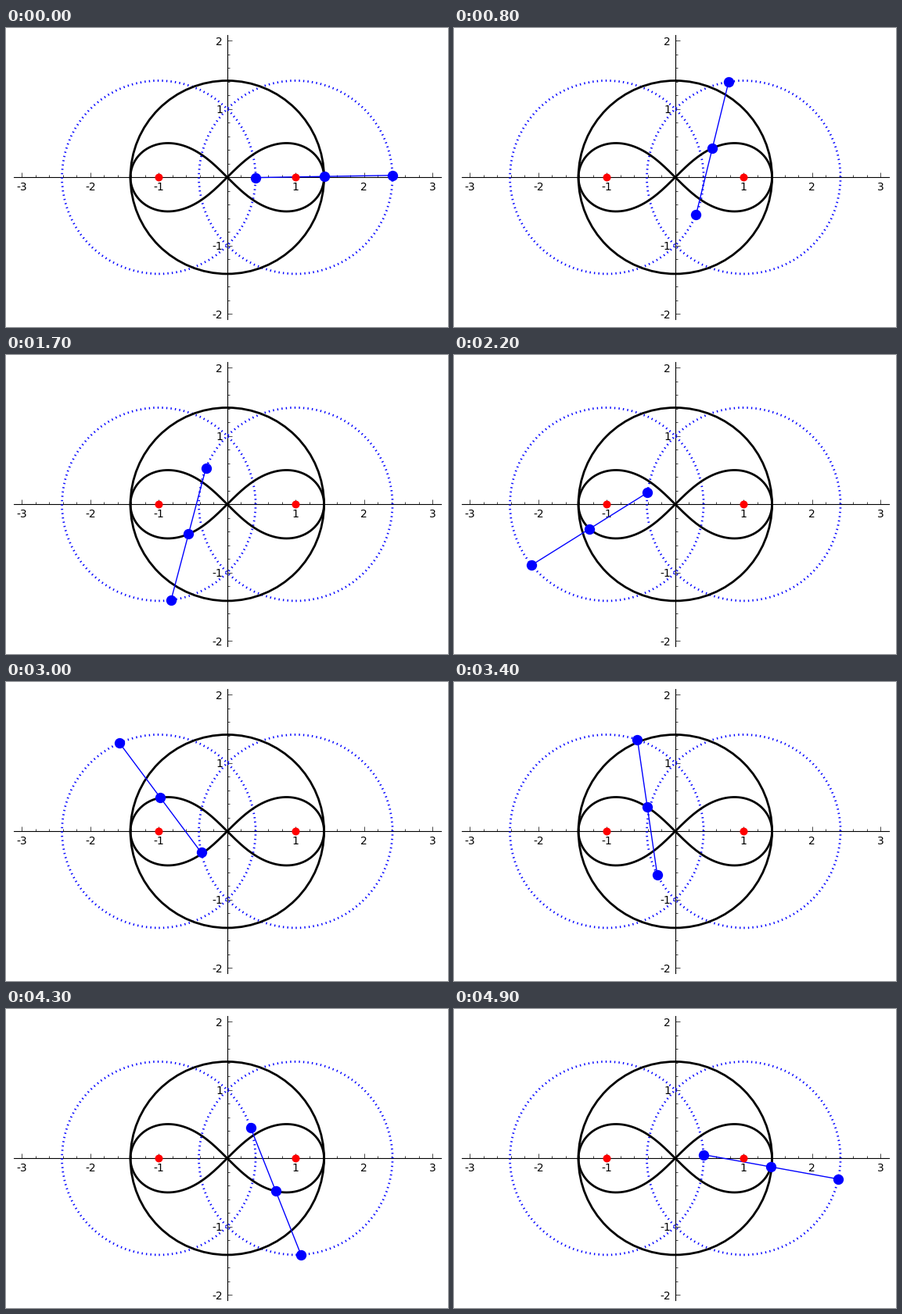
A matplotlib script that plays this animation: 565x383 px, repeating every 5000 ms.

```python
import numpy as np
import matplotlib.pyplot as plt
from matplotlib.animation import FuncAnimation
from matplotlib.patches import Circle

W, H, DPI = 565, 383, 100
FRAMES, INTERVAL = 50, 100
AX_W, AX_H = 546, 364
LEFT, TOP = 9.8, 9.2
R = np.sqrt(2)

plt.rcParams["font.family"] = "DejaVu Sans"
plt.rcParams["axes.unicode_minus"] = False


def lemniscate(t):
    s, c = np.sin(t), np.cos(t)
    x = R * c / (1 + s * s)
    return x, x * s


def linkage(frame):
    """Left end, middle and right end of the moving rod."""
    u = 2 * np.pi * frame / FRAMES + np.radians(0.6)
    t = u + np.radians(-6.95 * np.sin(2 * u) + 0.35 * np.sin(4 * u))
    x, y = lemniscate(t)
    # the rod turns at twice the polar angle of its midpoint
    tilt = 2 * np.arctan(np.sin(t))
    k = np.array([-1, 0, 1])
    return x + k * np.cos(tilt), y + k * np.sin(tilt)


def setup_axes(fig):
    ax = fig.add_axes([LEFT / W, 1 - (TOP + AX_H) / H, AX_W / W, AX_H / H])
    ax.set(xlim=(-3.12, 3.12), ylim=(-2.08, 2.08))
    ax.patch.set_visible(False)
    for side in ("top", "right"):
        ax.spines[side].set_visible(False)
    for side in ("left", "bottom"):
        ax.spines[side].set_position("zero")
        ax.spines[side].set_linewidth(0.8)
    for axis, top in ((ax.xaxis, 3), (ax.yaxis, 2)):
        major = [n for n in range(-top, top + 1) if n]
        axis.set_ticks(major, labels=[str(n) for n in major])
        minor = [n / 5 for n in range(-5 * top, 5 * top + 1) if n % 5]
        axis.set_ticks(minor, minor=True)
    ax.tick_params(which="both", direction="in", width=0.5, pad=4, labelsize=10)
    ax.tick_params(which="major", length=4)
    ax.tick_params(which="minor", length=2)
    return ax


fig = plt.figure(figsize=(W / DPI, H / DPI), dpi=DPI, facecolor="white")
ax = setup_axes(fig)

for cx in (-1, 1):
    ax.add_patch(Circle((cx, 0), R, fill=False, ec="blue", lw=2,
                        ls=(0, (0.5, 1.5)), zorder=3))
ax.add_patch(Circle((0, 0), R, fill=False, ec="black", lw=2, zorder=3))
ax.plot(*lemniscate(np.linspace(0, 2 * np.pi, 400)), color="black", lw=2, zorder=3)
ax.plot([-1, 1], [0, 0], "o", color="red", ms=7.2, mew=0, zorder=5)

rod, = ax.plot([], [], color="blue", lw=1, zorder=4)
joints, = ax.plot([], [], "o", color="blue", ms=9.6, mew=0, zorder=6, clip_on=False)


def update(frame):
    x, y = linkage(frame)
    rod.set_data(x, y)
    joints.set_data(x, y)
    return rod, joints


anim = FuncAnimation(fig, update, frames=FRAMES, interval=INTERVAL,
                     repeat=True, repeat_delay=0)
plt.show()
```
